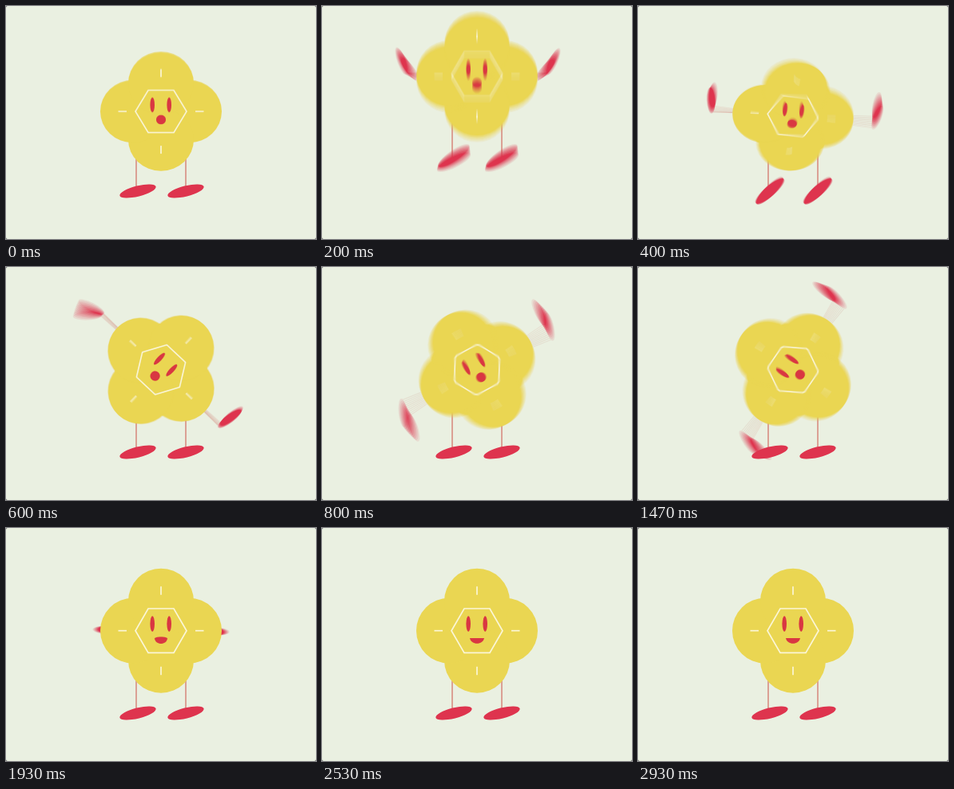
These frames come from a looping animation (388x292 px, 2990 ms). An HTML page with a canvas:

```html
<!DOCTYPE html>
<html lang="en">
<head>
<meta charset="utf-8">
<title>Dancing flower</title>
<style>
  html, body { margin: 0; width: 100%; height: 100%; overflow: hidden; background: #555; }
  canvas { display: block; width: 388px; height: 292px; border-radius: 2px; }
</style>
</head>
<body>
<canvas id="stage" width="388" height="292"></canvas>
<script>
const W = 388, H = 292, LOOP = 2990, STEPS = 45;
const SHUTTER = 30, SAMPLES = 10;
const PAPER = '#eaf0e1', YELLOW = '#ead652', CREAM = '#fbf6d6';
const RED = '#de344e', FACE = '#d93742', LIMB = '#cc5148';
const CX = 194, GROUND = 207, HALF = 78.3;

const rad = deg => deg * Math.PI / 180;
const mix = (a, b, k) => a + (b - a) * k;

// Sine ease from 0 to 1 between two times.
function ease(t, from, to) {
  const u = Math.min(1, Math.max(0, (t - from) / (to - from)));
  return (1 - Math.cos(Math.PI * u)) / 2;
}

// Smooth hump that peaks at 1 around a time.
const bump = (t, mid, width) => ease(t, mid - width, mid) - ease(t, mid, mid + width);

// Swing that speeds up, leaning a little to the left.
function swing(t) {
  const u = Math.max(0, t - 350) / 1000;
  const angle = 55 * Math.sin(6.67 * u + 2.37 * u * u) - 10;
  return angle * (ease(t, 300, 480) - ease(t, 1650, 1920));
}

// Crouch, leap, land, dance, then tuck the arms in and smile.
function poseAt(t) {
  const raised = ease(t, 90, 260) - ease(t, 1680, 1930);
  return {
    squash: 1 - .07 * bump(t, 50, 110) - .135 * bump(t, 425, 110),
    lift: 48 * bump(t, 240, 160),
    turn: swing(t),
    reach: 30 + 72 * (ease(t, 90, 260) - ease(t, 1680, 2060)),
    right: 3 - 84 * raised,
    left: 3 + mix(82, -77, ease(t, 450, 680)) * raised,
    foot: -14 - 42 * bump(t, 320, 210),
    smile: ease(t, 1740, 2060)
  };
}

const screen = document.getElementById('stage').getContext('2d');
const layer = document.createElement('canvas');
layer.width = W;
layer.height = H;
const c = layer.getContext('2d');

function oval(x, y, rx, ry, angle, color) {
  c.fillStyle = color;
  c.beginPath();
  c.ellipse(x, y, rx, ry, rad(angle), 0, 2 * Math.PI);
  c.fill();
}

function line(x1, y1, x2, y2, color, width) {
  c.strokeStyle = color;
  c.lineWidth = width;
  c.beginPath();
  c.moveTo(x1, y1);
  c.lineTo(x2, y2);
  c.stroke();
}

function arm(side, reach, bend) {
  c.save();
  if (side < 0) c.rotate(Math.PI);
  line(0, 0, reach, 0, LIMB, 1);
  c.translate(reach, 0);
  c.rotate(rad(bend));
  oval(16, 0, 18, 5.2, 0, RED);
  c.restore();
}

// Round at k = 0, a smiling half disc at k = 1.
function mouth(k) {
  const y = mix(10.8, 9.2, k), w = mix(6, 9, k), pull = mix(6, 7.5, k);
  const top = y - mix(8, 0, k), bottom = y + mix(8, 9, k);
  c.fillStyle = FACE;
  c.beginPath();
  c.moveTo(-w, y);
  c.bezierCurveTo(-pull, top, pull, top, w, y);
  c.bezierCurveTo(pull, bottom, -pull, bottom, -w, y);
  c.fill();
}

// Runs a drawing once per petal, facing outward along x.
function eachPetal(draw) {
  for (let i = 0; i < 4; i++) {
    c.save();
    c.rotate(i * Math.PI / 2);
    draw(i % 2 ? 37 : 35);
    c.restore();
  }
}

function flower(smile) {
  eachPetal(out => oval(out, 0, 41, 41, 0, YELLOW));
  eachPetal(out => line(out + 8, 0, out + 18.5, 0, CREAM, 1.7));
  c.strokeStyle = CREAM;
  c.lineWidth = 1.7;
  c.beginPath();
  for (let i = 0; i < 6; i++) c.lineTo(32 * Math.cos(i * Math.PI / 3), 32 * Math.sin(i * Math.PI / 3));
  c.closePath();
  c.stroke();
  for (const side of [-1, 1]) oval(side * 10.5 - .3, -8.6, 2.8, 9.8, 0, FACE);
  mouth(smile);
}

function drawPose(t) {
  const p = poseAt(t);
  c.fillStyle = PAPER;
  c.fillRect(0, 0, W, H);
  c.save();
  c.translate(0, -p.lift);
  for (const side of [-1, 1]) line(CX + side * 31, 165, CX + side * 31, 229, LIMB, 1);

  c.save();
  c.translate(CX, GROUND);
  c.scale(1, p.squash);
  c.translate(0, -HALF);
  c.rotate(rad(p.turn));
  arm(1, p.reach, p.right);
  arm(-1, p.reach, p.left);
  flower(p.smile);
  c.restore();

  for (const side of [-1, 1]) oval(CX + 1 + side * 30, 232, 23.3, 6.6, p.foot, RED);
  c.restore();
}

// Averages several nearby poses for motion blur.
function render(t) {
  for (let i = 0; i < SAMPLES; i++) {
    const offset = ((i + .5) / SAMPLES - .5) * SHUTTER;
    drawPose(Math.max(0, t + offset));
    screen.globalAlpha = 1 / (i + 1);
    screen.drawImage(layer, 0, 0);
  }
}

const begin = performance.now();
let shown = -1;
function tick() {
  const time = (performance.now() - begin) % LOOP;
  const step = Math.floor(time * STEPS / LOOP);
  if (step !== shown) {
    shown = step;
    render(step * 1000 / 15);
  }
  requestAnimationFrame(tick);
}
tick();
</script>
</body>
</html>
```
